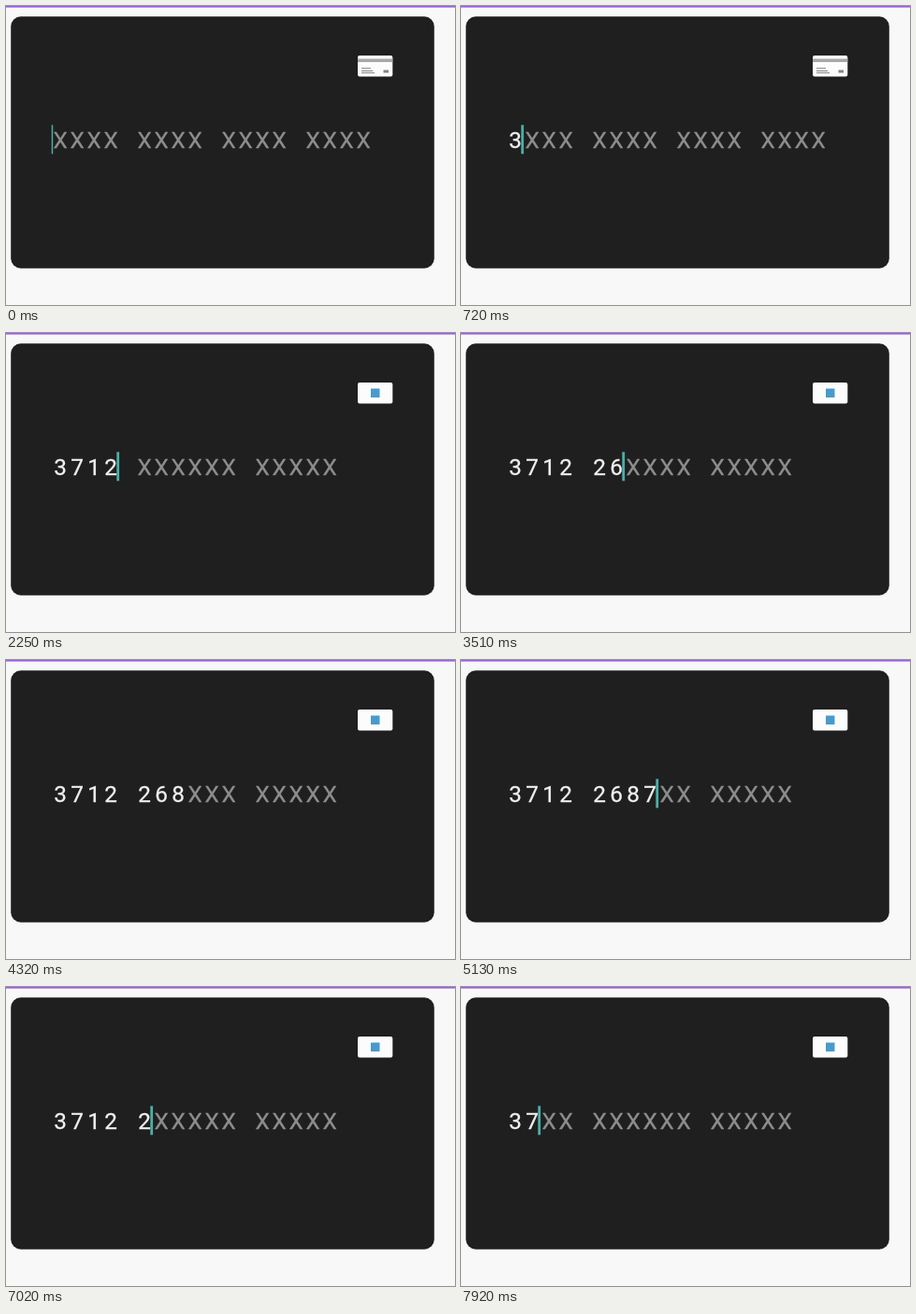
An HTML page for the animation above (8 s loop, 480 by 320 pixels).

```html
<!DOCTYPE html>
<html lang="en">
<head>
<meta charset="utf-8">
<title>Card number field</title>
<style>
  html, body { margin: 0; width: 100%; height: 100%; overflow: hidden; background: #f8f8f8; }
  svg { display: block; width: 480px; height: 320px; }
  .soft { filter: blur(.4px); }
  text {
    font: 24.3px Roboto, "Liberation Sans", sans-serif; text-anchor: middle;
    fill: #8e8e8e; stroke: #8e8e8e; stroke-width: .3px;
  }
  text.typed { fill: #f0f0f0; stroke: #f0f0f0; }
</style>
</head>
<body>
<svg viewBox="0 0 480 320">
  <rect width="480" height="320" fill="#f8f8f8"/>
  <rect width="480" height="1.6" fill="#a05cf0"/>
  <g class="soft">
    <rect x="5.2" y="11.3" width="452.6" height="269.4" rx="10.5" fill="#1f1f1f"/>
    <rect x="376" y="53" width="37.3" height="22.6" rx="2" fill="#fcfcfc"/>
    <g id="blank">
      <path d="M376 56.5h37.3v3.6h-37.3z" fill="#a9a7a8"/>
      <path d="M380 66.7h10M380 69.5h12M380 71.6h14" stroke="#77757a" stroke-width=".9"/>
      <path d="M403.5 68.5h5.5v3h-5.5z" fill="#858388"/>
    </g>
    <rect id="brand" x="390" y="59.5" width="9.5" height="9.5" fill="#479bcb"/>
    <g id="number"></g>
    <rect id="caret" y="127.3" height="31" fill="#4ab0a8"/>
  </g>
</svg>
<script>
  const LOOP = 8000, BLINK = 500, PITCH = 18, LEFT = 49;
  const DIGITS = "371226874";
  const TYPED_AT = [630, 1080, 1710, 2070, 2610, 3240, 3780, 4770, 5400];
  const ERASE_FROM = 6300, ERASE_STEP = 230, ERASE_COUNT = 7;
  const GENERIC = "XXXX XXXX XXXX XXXX", SHORT = "XXXX XXXXXX XXXXX";

  const byId = id => document.getElementById(id);
  const caret = byId("caret"), blank = byId("blank"), brand = byId("brand");

  const cells = Array.from(GENERIC, (_, i) => {
    const cell = document.createElementNS("http://www.w3.org/2000/svg", "text");
    cell.setAttribute("x", LEFT + PITCH * (i + 0.5));
    cell.setAttribute("y", 152.4);
    return byId("number").appendChild(cell);
  });

  // Digits on show and the time of the latest edit
  function stateAt(t) {
    if (t >= ERASE_FROM) {
      const step = Math.min(Math.floor((t - ERASE_FROM) / ERASE_STEP), ERASE_COUNT - 1);
      return { count: DIGITS.length - step - 1, edit: ERASE_FROM + step * ERASE_STEP };
    }
    const count = TYPED_AT.filter(at => at <= t).length;
    return { count, edit: count ? TYPED_AT[count - 1] : 0 };
  }

  function draw(t) {
    const { count, edit } = stateAt(t);
    const known = count >= 2;
    const mask = known ? SHORT : GENERIC;
    let used = 0, end = 0;

    cells.forEach((cell, i) => {
      const slot = mask[i] || "";
      const typed = slot === "X" && used < count;
      cell.textContent = typed ? DIGITS[used++] : slot;
      cell.setAttribute("class", typed ? "typed" : "");
      if (typed) end = i + 1;
    });

    // The field's left edge cuts off half of the caret
    const right = LEFT + PITCH * end + (end ? 0.1 : 1.2);
    const width = end ? 2.8 : 1.5;
    caret.setAttribute("x", right - width);
    caret.setAttribute("width", width);
    caret.style.opacity = (t - edit) % (2 * BLINK) < BLINK ? 1 : 0;
    blank.style.display = known ? "none" : "";
    brand.style.display = known ? "" : "none";
  }

  const start = performance.now();
  function tick() {
    draw((performance.now() - start) % LOOP);
    requestAnimationFrame(tick);
  }
  tick();
</script>
</body>
</html>
```
